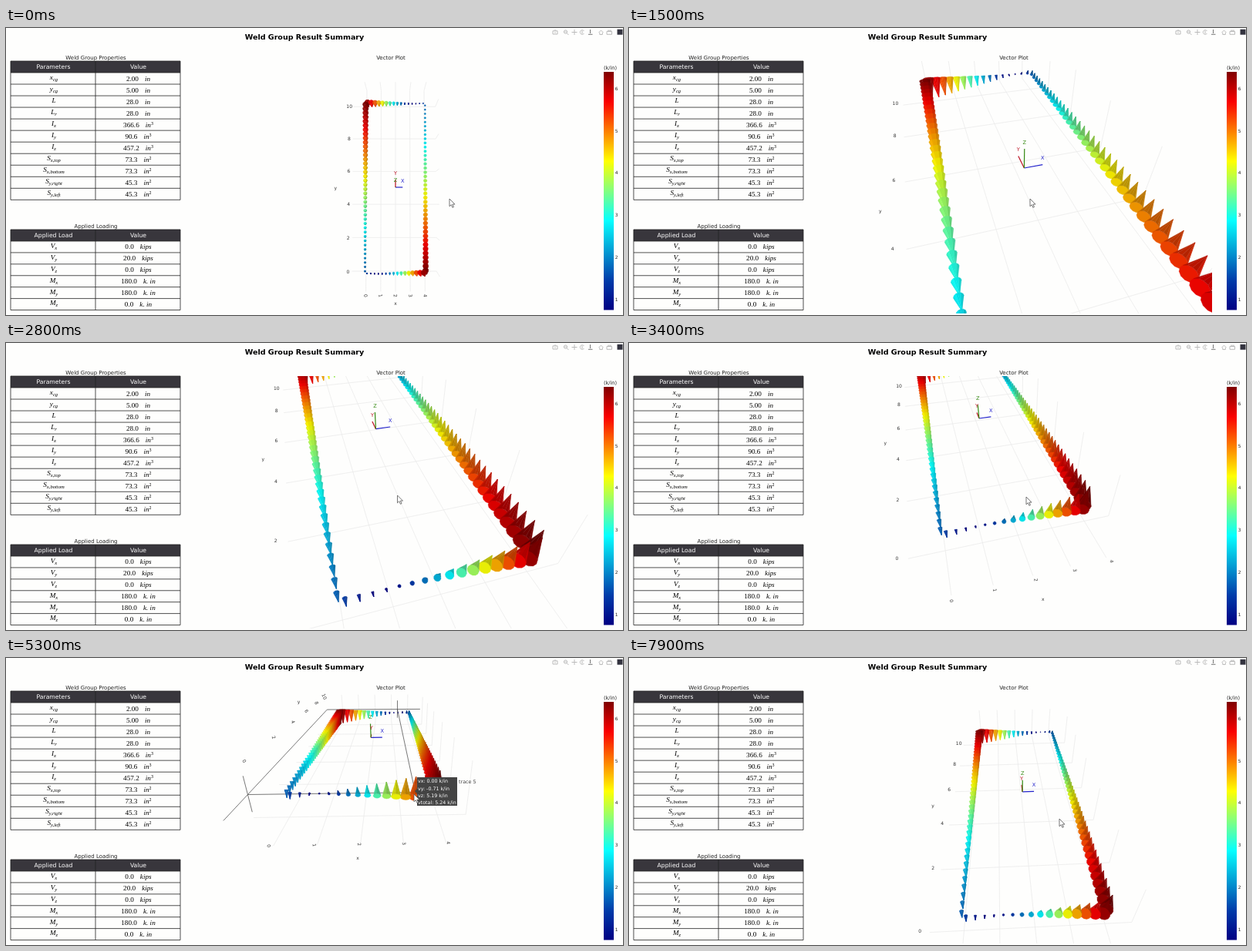
Recreate the animation shown at these times as an HTML page with a canvas. Size 800 by 373 pixels, loop 8000 ms.

```html
<!DOCTYPE html>
<html lang="en">
<head>
<meta charset="utf-8">
<title>Weld Group Result Summary</title>
<style>
html, body { margin: 0; width: 100%; height: 100%; overflow: hidden; background: #fefefd; }
#stage { position: relative; width: 800px; height: 373px; overflow: hidden; }
canvas, svg { position: absolute; left: 0; top: 0; width: 800px; height: 373px; }
text { font-family: "DejaVu Sans", Verdana, sans-serif; font-size: 7px; fill: #222; }
.mid { text-anchor: middle; }
.math { font-family: "Liberation Serif", "Times New Roman", serif; font-size: 9.2px; fill: #000; text-anchor: middle; }
.it { font-style: italic; }
.tick { font-size: 6px; fill: #333; text-anchor: middle; }
</style>
</head>
<body>
<div id="stage">
<canvas></canvas>
<svg viewBox="0 0 800 373">
  <defs>
    <linearGradient id="jet" x1="0" y1="1" x2="0" y2="0"></linearGradient>
    <clipPath id="plot"><rect x="253" y="43" width="503" height="328"/></clipPath>
  </defs>
  <g id="fixed"></g>
  <g id="labels" clip-path="url(#plot)"></g>
  <g id="tip" display="none">
    <path d="M530 173L533 170V155H585V192H533V176Z" fill="#444"/>
    <text x="587" y="162.5" style="font-size:6.4px;fill:#444">trace 5</text>
  </g>
  <path id="cursor" d="M0 0V9.8L2.3 7.7L3.9 11.3L5.5 10.6L3.9 7.1H7Z" fill="#fff" stroke="#555" stroke-width=".8"/>
</svg>
</div>
<script>
const LOOP = 8000, STEP = 100, FOCAL = 396, CX = 505, CY = 207, XS = 0.88;
const byId = id => document.getElementById(id);
const canvas = document.querySelector('canvas');
const ratio = Math.max(1, window.devicePixelRatio || 1);
canvas.width = 800 * ratio;
canvas.height = 373 * ratio;
const ctx = canvas.getContext('2d');

function add(parent, tag, attrs, text) {
  const el = document.createElementNS('http://www.w3.org/2000/svg', tag);
  for (const k in attrs) el.setAttribute(k, attrs[k]);
  if (text !== undefined) el.textContent = text;
  parent.appendChild(el);
  return el;
}

// Colour scale
const JET = [[0, 0, 0, 131], [.125, 0, 60, 170], [.375, 5, 255, 255],
  [.625, 255, 255, 0], [.875, 250, 0, 0], [1, 128, 0, 0]];
const VMIN = 0.75, VMAX = 6.41;
function jet(v) {
  const p = Math.min(1, Math.max(0, (v - VMIN) / (VMAX - VMIN)));
  let i = 1;
  while (i < JET.length - 1 && p > JET[i][0]) i++;
  const a = JET[i - 1], b = JET[i], k = (p - a[0]) / (b[0] - a[0]);
  return [1, 2, 3].map(c => a[c] + (b[c] - a[c]) * k);
}

// Still parts
const fixed = byId('fixed');
function table(top, rowH, title, heads, rows) {
  const end = top + 15 + rowH * rows.length;
  add(fixed, 'text', { x: 116.5, y: top - 2, class: 'mid' }, title);
  add(fixed, 'rect', { x: 6, y: top, width: 220, height: 15, fill: '#38363c' });
  heads.forEach((h, i) => add(fixed, 'text',
    { x: i ? 171.5 : 61.5, y: top + 10.3, class: 'mid', style: 'font-size:7.7px;fill:#fff' }, h));
  rows.forEach(([name, sub, value, unit, power], i) => {
    const mid = top + 15 + rowH * (i + .5);
    const label = add(fixed, 'text', { x: 62, y: mid + 1.4, class: 'math it' }, name);
    add(label, 'tspan', { dy: 2, style: 'font-size:6.6px' }, sub);
    const val = add(fixed, 'text', { x: 171.5, y: mid + 3, class: 'math' }, value);
    add(val, 'tspan', { dx: 8, class: 'it' }, unit);
    if (power) add(val, 'tspan', { dy: -3, style: 'font-size:6px' }, power);
  });
  let d = `M6 ${top}V${end}M116 ${top}V${end}M226 ${top}V${end}M6 ${top}H226`;
  for (let i = 0; i <= rows.length; i++) d += `M6 ${top + 15 + rowH * i}H226`;
  add(fixed, 'path', { d, stroke: '#222', 'stroke-width': .8, fill: 'none' });
}
table(43, 15.03, 'Weld Group Properties', ['Parameters', 'Value'], [
  ['x', 'cg', '2.00', 'in'], ['y', 'cg', '5.00', 'in'], ['L', '', '28.0', 'in'], ['L', 'r', '28.0', 'in'],
  ['I', 'x', '366.6', 'in', 3], ['I', 'y', '90.6', 'in', 3], ['I', 'z', '457.2', 'in', 3],
  ['S', 'x,top', '73.3', 'in', 2], ['S', 'x,bottom', '73.3', 'in', 2],
  ['S', 'y,right', '45.3', 'in', 2], ['S', 'y,left', '45.3', 'in', 2]]);
table(262, 14.92, 'Applied Loading', ['Applied Load', 'Value'], [
  ['V', 'x', '0.0', 'kips'], ['V', 'y', '20.0', 'kips'], ['V', 'z', '0.0', 'kips'],
  ['M', 'x', '180.0', 'k. in'], ['M', 'y', '180.0', 'k. in'], ['M', 'z', '0.0', 'k. in']]);

add(fixed, 'text', { x: 387, y: 14.6, class: 'mid', style: 'font-size:9.55px;font-weight:bold;fill:#000' },
  'Weld Group Result Summary');
add(fixed, 'text', { x: 499, y: 41, class: 'mid' }, 'Vector Plot');
JET.forEach(([p, ...c]) => add(byId('jet'), 'stop', { offset: p, 'stop-color': `rgb(${c})` }));
add(fixed, 'rect', { x: 775, y: 57, width: 13, height: 309.5, fill: 'url(#jet)' });
add(fixed, 'text', { x: 783.5, y: 53.5, class: 'mid', style: 'font-size:6.6px' }, '(k/in)');
for (let v = 1; v <= 6; v++)
  add(fixed, 'text', { x: 789.8, y: 409.2 - 54.7 * v, style: 'font-size:5.8px' }, v);

// Toolbar
const icon = (d, colour) => add(fixed, 'path', { d, stroke: colour, fill: 'none', 'stroke-width': 1 });
icon('M709 3.8H715V8H709ZM711 3H713M711.2 6H712.8', '#bbb');
icon('M727.6 5A2.1 2.1 0 1 1 723.4 5A2.1 2.1 0 1 1 727.6 5M727 6.5L729.5 9M724.5 5H726.5', '#bbb');
icon('M733.5 5.5H740.5M737 2V9', '#bbb');
icon('M749.5 4A2.8 2.8 0 1 0 749.5 7M747 3.5V7.5', '#bbb');
icon('M757.5 2V7M755 8.3H760.5', '#777');
icon('M768.5 6L771.5 3L774.5 6M769.8 6V8.5H773.3V6', '#bbb');
icon('M779 4.5H785.5V8.3H779ZM780 3.2H785', '#bbb');
add(fixed, 'rect', { x: 792.5, y: 1.7, width: 7, height: 7, fill: '#33333f' });

['vx: 0.00 k/in', 'vy: -0.71 k/in', 'vz: 5.19 k/in', 'vtotal: 5.24 k/in'].forEach((s, i) =>
  add(byId('tip'), 'text', { x: 534, y: 162.4 + 9.1 * i, style: 'font-size:6.3px;fill:#fff' }, s));

// Camera keys: time, target x, target y, distance, azimuth, elevation, pointer x, pointer y
const KEYS = [
  [150, 0, 0, 17.9, 0, 87, 575, 222],
  [1500, -.29, -.56, 6.1, -16.2, 42, 520, 222],
  [2200, -.745, -1.658, 5.25, -15.9, 42.8, 500, 196],
  [3400, .157, -4.483, 7.46, -15.7, 43, 515, 200],
  [3600, .157, -4.483, 7.46, -15.7, 43, 515, 200],
  [4600, .717, -6.171, 6, -1.83, 29, 529, 177],
  [6300, .717, -6.171, 6, -1.83, 29, 529, 177],
  [6700, .759, -5.121, 7.004, -1.56, 36.3, 522, 143],
  [6900, .759, -5.121, 7.004, -1.56, 36.3, 522, 143],
  [7900, -.22, -1.428, 9.952, -3.12, 40, 558, 209]];
function poseAt(t) {
  if (t <= KEYS[0][0]) return KEYS[0];
  const i = KEYS.findIndex(k => k[0] >= t);
  if (i < 0) return KEYS[KEYS.length - 1];
  const a = KEYS[i - 1], b = KEYS[i];
  const k = (t - a[0]) / (b[0] - a[0]), s = k * k * (3 - 2 * k);
  return a.map((v, j) => v + (b[j] - v) * s);
}
let cam;
function setCamera([, tx, ty, dist, az, el]) {
  const r = Math.PI / 180;
  cam = { tx, ty, dist, ca: Math.cos(az * r), sa: Math.sin(az * r), ce: Math.cos(el * r), se: Math.sin(el * r) };
}
// Scene point (centred on the weld group) to [screen x, screen y, depth]
function project(X, Y, Z) {
  const qx = X - cam.tx, qy = Y - cam.ty;
  const u = qx * cam.ca + qy * cam.sa, w = qy * cam.ca - qx * cam.sa;
  const depth = Math.max(.2, cam.dist + w * cam.ce - Z * cam.se);
  const v = w * cam.se + Z * cam.ce;
  return [CX + FOCAL * u / depth, CY - FOCAL * v / depth, depth];
}

// Weld cones at the middle of quarter-inch pieces
const cones = [];
function cone(x, y) {
  const vy = -20 / 28, vz = 180 * (5 - y) / 366.6 + 180 * (x - 2) / 90.6;
  const mag = Math.hypot(vy, vz);
  cones.push({ X: (x - 2) * XS, Y: y - 5, mag, dy: vy / mag, dz: vz / mag, rgb: jet(mag) });
}
for (let s = .125; s < 10; s += .25) { cone(0, s); cone(4, s); }
for (let s = .125; s < 4; s += .25) { cone(s, 0); cone(s, 10); }

const SIDES = 12;
function polygon(points, rgb, light) {
  ctx.fillStyle = ctx.strokeStyle = `rgb(${rgb.map(c => Math.round(c * light))})`;
  ctx.beginPath();
  points.forEach(p => ctx.lineTo(p[0], p[1]));
  ctx.closePath();
  ctx.fill();
  ctx.stroke();
}
const area = (a, b, c) => (b[0] - a[0]) * (c[1] - a[1]) - (b[1] - a[1]) * (c[0] - a[0]);
function drawCone({ X, Y, mag, dy, dz, rgb }) {
  const len = .105 * mag, rad = .0265 * mag, ring = [];
  const at = k => [Y + dy * len * k, dz * len * k];
  const [by, bz] = at(-.25), tip = project(X, ...at(.75));
  for (let i = 0; i < SIDES; i++) {
    const a = i / SIDES * 2 * Math.PI, c = rad * Math.cos(a), s = rad * Math.sin(a);
    ring.push(project(X + c, by - dz * s, bz + dy * s));
  }
  ctx.lineWidth = .35;
  if (area(ring[0], ring[4], ring[8]) > 0) polygon(ring, rgb, .93);
  for (let i = 0; i < SIDES; i++) {
    const p = ring[i], q = ring[(i + 1) % SIDES];
    if (area(p, q, tip) < 0)
      polygon([p, q, tip], rgb, .86 + .12 * Math.cos((i + .5) / SIDES * 2 * Math.PI - 2.4) - (i % 2) * .04);
  }
}

function line(a, b, colour, width) {
  const p = project(...a), q = project(...b);
  ctx.strokeStyle = colour;
  ctx.lineWidth = width;
  ctx.beginPath();
  ctx.moveTo(p[0], p[1]);
  ctx.lineTo(q[0], q[1]);
  ctx.stroke();
}
const BOX = { x0: -2.6, x1: 2.45, y0: -6.2, y1: 6, z0: -.6, z1: .75 };
function drawGrid() {
  const { x0, x1, y0, y1, z0, z1 } = BOX, c = '#e9e9e9';
  for (let x = 0; x <= 4; x++) {
    const X = (x - 2) * XS;
    line([X, y0, z0], [X, y1, z0], c, .7);
    line([X, y1, z0], [X, y1, z1], c, .7);
  }
  for (let y = -5; y <= 5; y += 2) {
    line([x0, y, z0], [x1, y, z0], c, .7);
    line([x1, y, z0], [x1, y, z1], c, .7);
  }
}
function drawSpikes() {
  const { x0, x1, y0, y1 } = BOX, X = 1.375 * XS, c = '#555';
  line([x0, -5, 0], [X, -5, 0], c, .8);
  line([X, -5, 0], [X, y1, 0], c, .8);
  line([x0, y0, 0], [x0, y1, 0], c, .8);
  line([x0, y1, 0], [x1, y1, 0], c, .8);
  line([x0, -5, -.45], [x0, -5, .45], c, .8);
  line([X, y1, -.45], [X, y1, .45], c, .8);
}

// Labels that follow the scene
const labels = byId('labels');
const label = (s, colour) => add(labels, 'text', { class: 'tick', style: colour ? `fill:${colour};font-size:6.6px` : '' }, s);
const xTicks = [0, 1, 2, 3, 4].map(v => label(v));
const yTicks = [0, 2, 4, 6, 8, 10].map(v => label(v));
const xTitle = label('x'), yTitle = label('y');
const AXES = [['X', [.42, 0, 0], '#2222cc'], ['Y', [0, .45, 0], '#bb1122'], ['Z', [0, 0, .5], '#338811']]
  .map(([s, end, colour]) => ({ end, colour, el: label(s, colour) }));
function place(el, p, turn = 0, dx = 0, dy = 0) {
  el.setAttribute('transform', `translate(${(p[0] + dx).toFixed(2)} ${(p[1] + dy).toFixed(2)}) rotate(${turn}) translate(0 2.2)`);
}
function placeLabels(el) {
  const high = el < 38;
  const yAxis = Y => high ? project(-2.49, Y, .788) : project(-2.82, Y, -.5);
  xTicks.forEach((e, i) => place(e, project((i - 2) * XS, -6.4, -.47), 83));
  yTicks.forEach((e, i) => place(e, yAxis(2 * i - 5), high ? 68 : 0));
  place(xTitle, project(0, -6.85, -.47));
  place(yTitle, yAxis(0), 0, high ? -2 : -17, high ? -19 : 0);
  AXES.forEach(a => place(a.el, project(...a.end), 0, 0, -8.5));
}

function render(t) {
  const pose = poseAt(t), hover = t >= 5000 && t < 5700;
  setCamera(pose);
  ctx.setTransform(ratio, 0, 0, ratio, 0, 0);
  ctx.clearRect(0, 0, 800, 373);
  ctx.save();
  ctx.beginPath();
  ctx.rect(253, 43, 503, 328);
  ctx.clip();
  drawGrid();
  if (hover) drawSpikes();
  cones.map(c => [project(c.X, c.Y, 0)[2], c]).sort((a, b) => b[0] - a[0]).forEach(([, c]) => drawCone(c));
  AXES.forEach(a => line([0, 0, 0], a.end, a.colour, 1.2));
  ctx.restore();
  placeLabels(pose[5]);
  byId('tip').setAttribute('display', hover ? 'inline' : 'none');
  byId('cursor').setAttribute('transform', `translate(${pose[6].toFixed(2)} ${pose[7].toFixed(2)})`);
}

function frame() {
  const t = performance.now() % LOOP;
  render(Math.floor(t / STEP) * STEP);
  requestAnimationFrame(frame);
}
frame();
</script>
</body>
</html>
```
